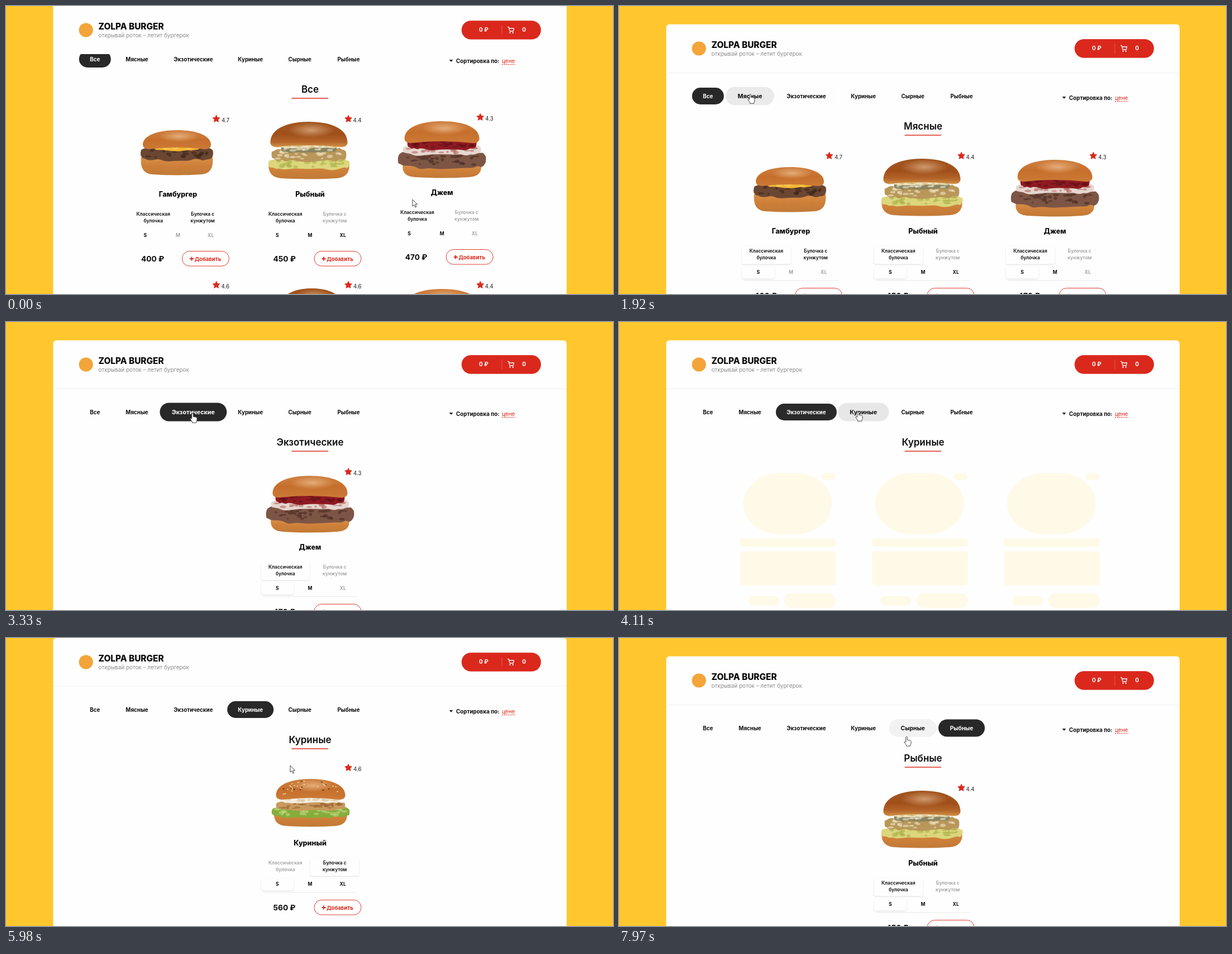
Recreate the animation shown at these times as an HTML page. Size 1087 by 515 pixels, loop 8 s.

```html
<!DOCTYPE html>
<html lang="ru">
<head>
<meta charset="utf-8">
<title>Бургеры</title>
<style>
html, body { margin: 0; width: 100%; height: 100%; overflow: hidden; background: #ffc72d; }
svg { display: block; width: 100vw; height: 100vh; }
text { font-family: Inter, "Open Sans", sans-serif; white-space: pre; }
.box { fill: #fefefe; filter: drop-shadow(0 1px 1px rgba(0, 0, 0, .13)); }
</style>
</head>
<body>
<svg id="stage" viewBox="0 0 1087 515">
  <defs>
    <linearGradient id="light" x2="0" y2="1">
      <stop offset="0" stop-color="#cf8142"/><stop offset=".5" stop-color="#c66f2c"/><stop offset="1" stop-color="#cc7a36"/>
    </linearGradient>
    <linearGradient id="dark" x2="0" y2="1">
      <stop offset="0" stop-color="#a2561f"/><stop offset=".5" stop-color="#a04f1a"/><stop offset=".8" stop-color="#b5662a"/><stop offset="1" stop-color="#cf9147"/>
    </linearGradient>
    <linearGradient id="base" x2="0" y2="1">
      <stop offset="0" stop-color="#d88f48"/><stop offset=".5" stop-color="#cd7f38"/><stop offset="1" stop-color="#c07a38"/>
    </linearGradient>
    <radialGradient id="shine">
      <stop offset="0" stop-color="#ffe3bd" stop-opacity=".5"/><stop offset="1" stop-color="#ffe3bd" stop-opacity="0"/>
    </radialGradient>
  </defs>
</svg>
<script>
const LOOP = 8000, FADE = 300, RED = '#da291c', INK = '#0c0c0c', MUTED = '#a2a2a2';
const COLS = [308, 544.5, 780.7];
const stage = document.getElementById('stage');

function add(parent, tag, attrs) {
  const node = document.createElementNS('http://www.w3.org/2000/svg', tag);
  for (const key in attrs) node.setAttribute(key, attrs[key]);
  return parent.appendChild(node);
}
const group = (parent) => add(parent, 'g', {});
const rect = (parent, x, y, x2, y2, rx, fill, more) =>
  add(parent, 'rect', { x, y, width: x2 - x, height: y2 - y, rx, fill, ...more });
const path = (parent, d, attrs) => add(parent, 'path', { d, ...attrs });
function text(parent, str, x, y, size, weight, fill = INK, anchor = 'middle') {
  const node = add(parent, 'text', { x, y, fill, 'font-size': size, 'font-weight': weight, 'text-anchor': anchor });
  node.textContent = str;
  return node;
}
function random(seed) {
  return () => (seed = (seed * 16807) % 2147483647) / 2147483647;
}

// Burger pictures: [centre shift, half width, crown top, crown bottom, heel top, heel bottom]
// and fillings [colour, crumb colour, top, height, half width, shift].
const BURGERS = {
  ham: { tone: 'light', bun: [-2, 61, 288, 322, 336, 368], fill: [
    ['#6b4632', '#3a2418', 317, 25, 65], ['#f3b632', '#f9cf5c', 313, 12, 40]] },
  fish: { tone: 'dark', bun: [-2, 69, 273, 318, 346, 375], fill: [
    ['#dcd67c', '#a9b04a', 338, 20, 73], ['#b9975a', '#f0e4c4', 319, 25, 67],
    ['#8a8560', '#eee6cc', 314, 14, 50], ['#efe3c2', '#d9b878', 310, 10, 66]] },
  jam: { tone: 'light', bun: [0, 67, 275, 314, 353, 376], fill: [
    ['#7d5545', '#4a2a22', 328, 31, 79], ['#e6d6d0', '#b06a62', 316, 20, 70], ['#8e1a22', '#5a0d16', 304, 22, 62]] },
  classic: { tone: 'light', bun: [-2, 69, 272, 313, 350, 381], fill: [
    ['#e8d7a8', '#d9603a', 336, 14, 70], ['#93bf45', '#cfe28a', 344, 24, 42, 32], ['#6a4430', '#40281c', 312, 27, 69],
    ['#f6a81c', '#fbc04a', 304, 22, 54], ['#f6a81c', '#fbc04a', 318, 20, 16, -14]] },
  don: { tone: 'light', bun: [1, 68, 269, 309, 356, 382], fill: [
    ['#d8452f', '#b02c1c', 347, 12, 74], ['#7a5040', '#4a2c20', 328, 24, 74],
    ['#f3ede0', '#ddc9a8', 318, 25, 64], ['#8a3a1e', '#4e1a10', 302, 20, 67]] },
  chicken: { tone: 'light', seeds: true, bun: [1, 62, 288, 325, 347, 373], fill: [
    ['#86ad3c', '#c3d982', 337, 20, 70], ['#c99a5e', '#9a6430', 327, 17, 62], ['#f4eee0', '#d8c4a0', 317, 14, 56]] },
  cheese: { tone: 'dark', bun: [3, 57, 274, 317, 350, 380], fill: [
    ['#f2c53a', '#f6e4a0', 338, 18, 61], ['#ecd9a0', '#f3b73a', 316, 30, 58],
    ['#5a3522', '#8a5a3c', 324, 19, 24, -32], ['#f2b42a', '#f6e0a0', 309, 12, 56]] }
};

function blob(parent, cx, y, h, w, fill, rnd) {
  const n = 40, pts = [];
  const bend = (v, p) => Math.sign(v) * Math.abs(v) ** p;
  for (let i = 0; i < n; i++) {
    const a = i / n * 2 * Math.PI;
    pts.push([cx + w * bend(Math.cos(a), .6), y + h / 2 + h / 2 * bend(Math.sin(a), .5) * (.75 + .45 * rnd())]);
  }
  const mid = (i) => {
    const [a, b] = [pts[i % n], pts[(i + 1) % n]];
    return ((a[0] + b[0]) / 2).toFixed(1) + ' ' + ((a[1] + b[1]) / 2).toFixed(1);
  };
  let d = 'M' + mid(0);
  for (let i = 1; i <= n; i++) d += `Q${pts[i % n].map(v => v.toFixed(1))} ${mid(i)}`;
  path(parent, d + 'Z', { fill });
}

function burger(parent, cx, kind) {
  const { tone, bun, fill, seeds } = BURGERS[kind];
  const [dx, w, y0, y1, b0, b1] = bun, x = cx + dx, h = y1 - y0, rnd = random(w * 97 + y0), v = w + 3;
  path(parent, `M${x - v} ${b0}H${x + v}Q${x + v + 3} ${b1 - 3} ${x + v * .7} ${b1 - 1}Q${x} ${b1 + 2} ${x - v * .7} ${b1 - 1}Q${x - v - 3} ${b1 - 3} ${x - v} ${b0}Z`,
    { fill: 'url(#base)' });
  for (const [colour, crumb, y, hh, hw, shift = 0] of fill) {
    const c = x + shift;
    blob(parent, c, y, hh, hw, colour, rnd);
    for (let i = 0; i < hw / 2.5; i++) {
      add(parent, 'ellipse', { cx: c + (rnd() * 2 - 1) * hw * .88, cy: y + hh * (.2 + .6 * rnd()),
        rx: 2 + 4 * rnd(), ry: 1 + 2 * rnd(), fill: crumb, opacity: .6 });
    }
  }
  path(parent, `M${x - w} ${y1 - 8}C${x - w} ${y0 + h * .3} ${x - w * .6} ${y0} ${x} ${y0}S${x + w} ${y0 + h * .3} ${x + w} ${y1 - 8}Q${x + w} ${y1} ${x + w - 12} ${y1}Q${x} ${y1 - 6} ${x - w + 12} ${y1}Q${x - w} ${y1} ${x - w} ${y1 - 8}Z`,
    { fill: `url(#${tone})` });
  add(parent, 'ellipse', { cx: x + 4, cy: y0 + h * .33, rx: w * .6, ry: h * .3, fill: 'url(#shine)' });
  for (let i = 0; seeds && i < 32; i++) {
    const u = rnd() * 1.6 - .8;
    add(parent, 'ellipse', { cx: x + u * w, cy: y0 + 3 + u * u * h * .5 + rnd() * h * .4, rx: 1.6, ry: .9,
      fill: i % 3 ? '#f0d6a0' : '#4a2f1c' });
  }
}

// [name, rating, price, picture, bun states, size states]; 0 = disabled, 1 = enabled, 2 = chosen
const HAM = ['Гамбургер', '4.7', 400, 'ham', [2, 1], [2, 0, 0]];
const FISH = ['Рыбный', '4.4', 450, 'fish', [2, 0], [2, 1, 1]];
const JAM = ['Джем', '4.3', 470, 'jam', [2, 0], [2, 1, 0]];
const CLASSIC = ['Классический', '4.9', 660, 'classic', [2, 1], [2, 1, 1]];
const DON = ['Дор Велано', '4.8', 810, 'don', [2, 1], [0, 2, 1]];
const CHICKEN = ['Куриный', '4.6', 560, 'chicken', [0, 2], [2, 1, 1]];
const CHEESE = ['4 Сыра', '4.6', 520, 'cheese', [2, 1], [2, 1, 1]];
const BERRY = ['Ягодный', '4.4', 490, 'jam', [2, 0], [2, 1, 1]];

// [label, centre, pill width, cards]
const TABS = [
  ['Все', 159.3, 57, [HAM, FISH, JAM, CHICKEN, CHEESE, BERRY]],
  ['Мясные', 234.5, 80, [HAM, CLASSIC, DON]],
  ['Экзотические', 335.4, 109, [JAM]],
  ['Куриные', 437.7, 83, [CHICKEN]],
  ['Сырные', 526.2, 80.5, [CHEESE]],
  ['Рыбные', 613.5, 80, [FISH]]
];

let star = '';
for (let i = 0; i < 10; i++) {
  const a = i * Math.PI / 5, r = i % 2 ? 3.2 : 6.6;
  star += (i ? 'L' : 'M') + (Math.sin(a) * r).toFixed(2) + ' ' + (-Math.cos(a) * r).toFixed(2);
}
star += 'Z';

const boxes = [];
function card(parent, cx, [name, rating, price, kind, buns, sizes]) {
  const g = group(parent);
  burger(g, cx, kind);
  path(g, star, { transform: `translate(${cx + 68.6} 268)`, fill: RED, stroke: RED, 'stroke-width': 1, 'stroke-linejoin': 'round' });
  text(g, rating, cx + 92, 274.3, 9.7, 400, '#222', 'end');
  text(g, name, cx, 407, 12.5, 800);
  const frame = (x, y, x2, y2) => boxes.push(rect(g, x, y, x2, y2, 4, '#fefefe', { class: 'box' }));
  boxes.push(rect(g, cx - 84, 490.5, cx + 84, 491.5, 0, '#ececec'));
  [['Классическая', 'булочка'], ['Булочка с', 'кунжутом']].forEach((lines, i) => {
    const x = cx - 44.2 + 88.4 * i;
    if (buns[i] === 2) frame(x - 44, 430, x + 44, 461.5);
    lines.forEach((line, k) => text(g, line, x, 441.3 + 11.8 * k, 8.5, 600, buns[i] ? INK : MUTED));
  });
  ['S', 'M', 'XL'].forEach((size, i) => {
    const x = cx + 58.7 * (i - 1);
    if (sizes[i] === 2) frame(x - 29.3, 466, x + 29.3, 487.5);
    text(g, size, x, 479, 8.6, 700, sizes[i] ? INK : MUTED);
  });
  text(g, price + ' ₽', cx - 66, 523, 13.7, 700, INK, 'start');
  rect(g, cx + 7.5, 504.5, cx + 91.5, 531, 13.2, '#fefefe', { stroke: RED, 'stroke-width': .9 });
  path(g, `M${cx + 21} 518h7m-3.5-3.5v7`, { stroke: RED, 'stroke-width': 1.8 });
  text(g, 'Добавить', cx + 29.7, 521.6, 9.6, 700, RED, 'start');
  return g;
}

rect(stage, 0, 0, 1087, 515, 0, '#ffc72d');
const page = group(stage);
rect(page, 84.5, 32.7, 1004, 900, 6, '#fefefe');
rect(page, 85, 118.6, 1004, 119.6, 0, '#f1f1f1');

const pills = TABS.map(([label, , w]) => {
  const g = group(page);
  return { g, back: rect(g, -w / 2, -15, w / 2, 15, 15, '#fefefe'), label: text(g, label, 0, 3.5, 9.8, 700) };
});

path(page, 'M793.8 162h6.6l-3.3 4Z', { fill: '#222' });
text(page, 'Сортировка по:', 806, 167.6, 9.8, 700, INK, 'start');
text(page, 'цене', 888, 167.6, 10, 400, RED, 'start');
path(page, 'M888 170.5h24', { stroke: RED, 'stroke-width': 1, 'stroke-dasharray': '2.4 1.4' });

const heading = text(page, '', 544.5, 220.5, 17, 600);
rect(page, 511.5, 230.2, 577, 231.8, 0, '#df3d30');

const views = TABS.map(([, , , list]) => {
  const g = group(page);
  const cards = list.map((item, i) => {
    const row = group(g);
    if (i > 2) row.setAttribute('transform', 'translate(0 297)');
    const col = list.length === 1 ? 1 : i % 3;
    return { g: card(row, COLS[col], item), x: COLS[col], y: i > 2 ? 297 : 0 };
  });
  return { g, cards };
});

const skeleton = group(page);
for (const col of COLS) {
  const bone = (x, y, x2, y2, rx, ry = rx) => rect(skeleton, col + x, y, col + x2, y2, rx, '#fefae7', { ry });
  bone(-85.5, 270, 73, 379.5, 66, 54);
  bone(55, 270, 79.5, 282.5, 6);
  bone(-92, 387, 80, 402, 6);
  bone(-91, 410, 80, 471, 5);
  bone(-76.5, 490, -21, 507, 8);
  bone(-12, 485, 80, 511, 13);
}

const cover = rect(stage, 86, 0, 1003, 86, 0, '#fefefe');
const header = group(stage);
add(header, 'circle', { cx: 143.2, cy: 76, r: 12.6, fill: '#f3a53a' });
text(header, 'ZOLPA BURGER', 165.5, 74.8, 15.4, 800, INK, 'start');
text(header, 'открывай роток – летит бургерок', 165.5, 89, 9.95, 400, '#8a8a8a', 'start');
rect(header, 815.8, 59.2, 958, 92.8, 16.8, RED);
text(header, '0 ₽', 855.5, 79.4, 10.2, 700, '#fff');
rect(header, 887.5, 67, 888.5, 85, 0, '#e4574c');
path(header, 'M898 70.6h2.3l1.9 7.4h6l1.3-5h-8.4', { fill: 'none', stroke: '#fff', 'stroke-width': 1.3, 'stroke-linejoin': 'round' });
for (const cx of [902.6, 907.8]) add(header, 'circle', { cx, cy: 80.8, r: 1.2, fill: '#fff' });
text(header, '0', 927.6, 79.4, 10.2, 700, '#fff');

const look = { fill: '#fff', stroke: '#333', 'stroke-width': .9, 'stroke-linejoin': 'round' };
const arrow = path(stage, 'M0 0V12L2.9 9.5 4.9 14 6.8 13.2 4.9 8.8H8.6Z', look);
const hand = path(stage, 'M-1.3 1.3Q0-.8 1.3 1.3V6.6Q2.6 5.7 3.6 6.9 5 6 5.9 7.4 7.5 6.9 8 8.6V12Q8 14 6.8 15.2V17.2H-.5V15.6L-4 10.6Q-4 8.6-2.4 9.2L-1.3 10.3Z', look);

const CLICKS = [[1920, 1], [2990, 2], [4080, 3], [6683, 4], [7360, 5]];
const SCROLL = [[430, 66], [900, 0], [5230, 0], [5310, 16], [5420, 16], [5540, 33], [6010, 33], [6190, 0]];
const POINTER = [
  [1000, 728, 346], [1890, 235, 157], [2510, 235, 157], [2800, 334, 163], [3540, 334, 163], [4060, 428, 160],
  [4620, 428, 160], [5200, 509, 228], [6230, 509, 228], [6480, 516, 158], [7000, 516, 158], [7300, 613, 160]
];

const clamp = (v) => Math.min(1, Math.max(0, v));
const smooth = (v) => v * v * (3 - 2 * v);
const ease = (v) => 1 - (1 - clamp(v)) ** 2.2;

function track(keys, t) {
  if (t <= keys[0][0]) return keys[0].slice(1);
  for (let i = 1; i < keys.length; i++) {
    const a = keys[i - 1], b = keys[i];
    if (t < b[0]) {
      const k = smooth((t - a[0]) / (b[0] - a[0]));
      return a.slice(1).map((v, j) => v + (b[j + 1] - v) * k);
    }
  }
  return keys[keys.length - 1].slice(1);
}
const scrollAt = (t) => track(SCROLL, t)[0];
function pointerAt(t) {
  if (t <= 7820) return track(POINTER, t);
  const k = clamp((t - 7820) / 150);
  return [613 - 98 * k, 160 + 16 * k];
}

// Recent pointer places on the page, each weighted by its share of the eased fade.
const SAMPLES = 20;
function trail(t) {
  return Array.from({ length: SAMPLES }, (_, k) => {
    const at = t - k * FADE / SAMPLES, [x, y] = pointerAt(at);
    return [x, y + scrollAt(at), ease((k + 1) / SAMPLES) - ease(k / SAMPLES)];
  });
}
const hover = (marks, cx, cy, rx, ry) =>
  marks.reduce((sum, [x, y, w]) => sum + (Math.abs(x - cx) <= rx && Math.abs(y - cy) <= ry ? w : 0), 0);
const show = (node, on) => { node.style.display = on ? '' : 'none'; };
const grey = (v) => `rgb(${[v, v, v].map(Math.round)})`;

function draw(t) {
  const s = scrollAt(t), marks = trail(t), [px, py] = pointerAt(t);
  let title = 0, tab = 0, before = 0, lit = -FADE, loading = false;
  for (const [at, i] of CLICKS) {
    if (t < at) break;
    title = i;
    if (t < at + 30) break;
    before = tab;
    tab = i;
    lit = at + 30;
    loading = t < at + 115;
  }
  const fade = ease((t - lit) / FADE);

  page.setAttribute('transform', `translate(0 ${-s})`);
  header.setAttribute('transform', `translate(0 ${-Math.min(s, 33)})`);
  show(cover, s > 33);
  if (heading.textContent !== TABS[title][0]) heading.textContent = TABS[title][0];

  pills.forEach(({ g, back, label }, i) => {
    const [, cx, w] = TABS[i];
    const h = hover(marks, cx, 161, w / 2, 16);
    const on = i === tab ? fade : i === before ? 1 - fade : 0;
    const base = 254 - 22 * h;
    g.setAttribute('transform', `translate(${cx} 161) scale(${1 + .1 * h})`);
    back.setAttribute('fill', grey(base + (40 - base) * on));
    label.setAttribute('fill', grey(12 + 243 * on));
  });

  show(skeleton, loading);
  views.forEach(({ g, cards }, i) => {
    const on = i === tab && !loading;
    show(g, on);
    if (on) for (const c of cards) {
      c.g.setAttribute('transform', `translate(0 ${-3 * hover(marks, c.x, 400 + c.y, 98, 145)})`);
    }
  });
  for (const box of boxes) show(box, t >= 410);

  const overNav = Math.abs(py + s - 161) <= 16.5 && px > 131 && px < 657;
  show(hand, overNav);
  show(arrow, !overNav);
  (overNav ? hand : arrow).setAttribute('transform', `translate(${px} ${py})`);
}

const start = performance.now();
function tick(now) {
  draw(Math.max(0, now - start) % LOOP);
  requestAnimationFrame(tick);
}
draw(0);
requestAnimationFrame(tick);
</script>
</body>
</html>
```
